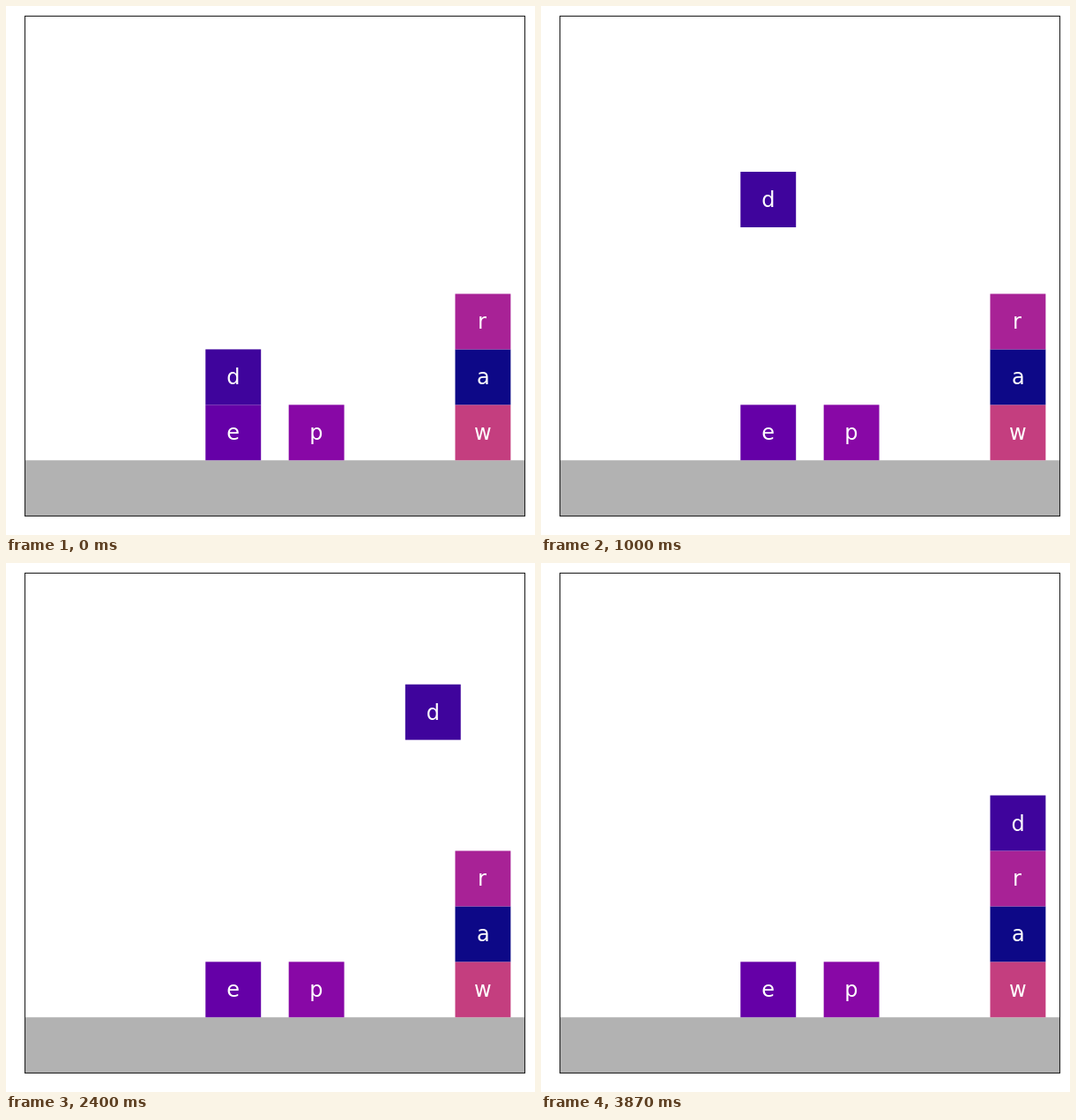
Write an HTML page with a canvas that moves like this. It is 600 px wide and 600 px high and loops after 4.87 s.

```html
<!DOCTYPE html>
<html lang="en">
<head>
<meta charset="utf-8">
<title>Stacking blocks</title>
<style>
  html, body { margin: 0; width: 100%; height: 100%; overflow: hidden; background: #fff; }
  canvas { display: block; }
</style>
</head>
<body>
<canvas id="stage" width="600" height="600"></canvas>
<script>
const ctx = document.getElementById('stage').getContext('2d');
const LOOP = 4870, TICK = 1000 / 15;
const UNIT = 62.93, LEFT = 21.75, FLOOR = 578.2;

// Columns and heights are in block units; (0, 0) is the lower left corner.
const column = i => 0.25 + 1.5 * i;
const blocks = [
  ['e', '#6500a7', column(2), 1],
  ['p', '#8808a6', column(3), 1],
  ['w', '#c43e7f', column(5), 1],
  ['a', '#0d0887', column(5), 2],
  ['r', '#a82296', column(5), 3]
];

function rect(x, y, w, h, color) {
  ctx.fillStyle = color;
  ctx.fillRect(LEFT + x * UNIT, FLOOR - (y + h) * UNIT, w * UNIT, h * UNIT);
}

function block(letter, color, x, y) {
  rect(x, y, 1, 1, color);
  const m = ctx.measureText(letter);
  const ink = (m.actualBoundingBoxRight - m.actualBoundingBoxLeft) / 2;
  ctx.fillStyle = '#fff';
  ctx.fillText(letter, LEFT + (x + 0.5) * UNIT - ink, FLOOR - (y + 0.5) * UNIT + 8.5);
}

// Lift, carry across, lower: each leg advances by a fixed amount per tick.
function carried(tick) {
  const lift = tick < 1 ? 0 : Math.min(tick + 1, 20);
  const shift = tick < 30 ? 0 : Math.min(tick - 28, 10);
  const drop = Math.max(0, Math.min(tick - 38, 20));
  return [column(2) + 0.45 * shift, 2 + 0.2 * lift - 0.1 * drop];
}

function draw(ms) {
  // Ticks fall on whole hundredths of a second.
  const tick = Math.floor((Math.floor(ms / 10) * 10 + 3.4) / TICK);
  ctx.fillStyle = '#fff';
  ctx.fillRect(0, 0, 600, 600);
  ctx.font = '24px "DejaVu Sans", sans-serif';
  ctx.textAlign = 'left';
  ctx.textBaseline = 'alphabetic';

  rect(0, 0, 9, 1, '#b2b2b2');
  for (const b of blocks) block(...b);
  block('d', '#3f049c', ...carried(tick));

  ctx.strokeStyle = '#222';
  ctx.lineWidth = 1.1;
  ctx.strokeRect(21.5, 11.5, 567, 567);
}

const start = performance.now();
function frame() {
  draw((performance.now() - start) % LOOP);
  requestAnimationFrame(frame);
}
frame();
</script>
</body>
</html>
```
